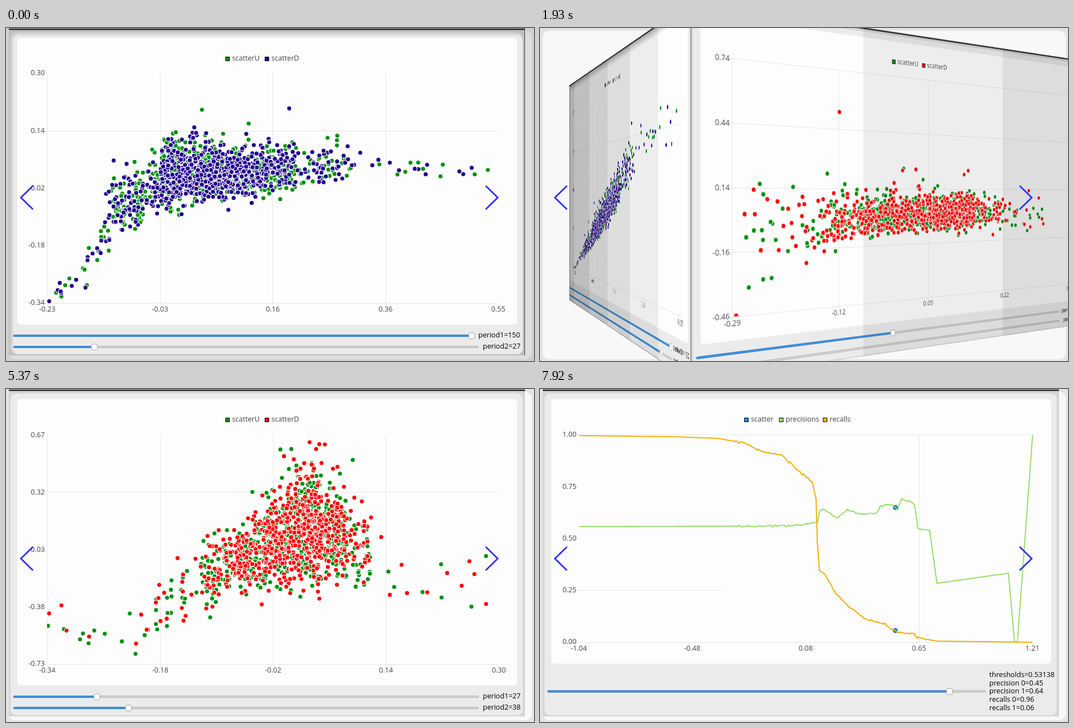
An HTML page with a canvas for the animation above (8 s loop, 939 by 593 pixels).

```html
<!DOCTYPE html>
<html lang="en">
<head>
<meta charset="utf-8">
<title>Rotating charts</title>
<style>
html, body { margin: 0; width: 100%; height: 100%; overflow: hidden; }
#stage { position: relative; width: 939px; height: 593px; overflow: hidden; background: #e4e4e4;
  perspective: 1199px; perspective-origin: 464px 297px; }
#panel { position: absolute; left: 5px; top: 5px; width: 930px; height: 585px; border-radius: 12px; background: #f8f8f8; }
#stage.grey { background: #d0d0d0; }
#stage.grey #panel { background: #dedede; }
.face { position: absolute; left: 5px; top: 0; width: 918px; height: 583px; transform-origin: 459px 297px -459px; }
.face canvas, .face div { position: absolute; left: 0; top: 0; width: 918px; height: 583px; }
svg { position: absolute; left: 0; top: 0; }
</style>
</head>
<body>
<div id="stage">
  <div id="panel"></div>
  <div class="face"><canvas width="918" height="583"></canvas><div></div></div>
  <div class="face"><canvas width="918" height="583"></canvas><div></div></div>
  <svg width="939" height="593" fill="none">
    <path d="M48 281L26.500 302L48 323M853 281L874.500 302L853 323" stroke="#2f2fff" stroke-width="2.800"/>
    <path id="cursor" d="M880 311v18.500l4.300-4l3.200 7.300l3.200-1.400l-3.200-7h5.700z" fill="#fff" stroke="#000" stroke-width="1.300"/>
  </svg>
</div>
<script>
const LOOP = 8000, STEP = 149.6;
const GREEN = '#00900f', BLUE = '#23008c', RED = '#ff0000';
const FONT = '12.6px "Open Sans", "Noto Sans", sans-serif';
const $ = id => document.getElementById(id);
const mix = (a, b, k) => a + (b - a) * k;

// Piecewise linear lookup through [x, y] points.
function at(points, x) {
  if (x <= points[0][0]) return points[0][1];
  for (let i = 1; i < points.length; i++) {
    const [x0, y0] = points[i - 1], [x1, y1] = points[i];
    if (x <= x1) return mix(y0, y1, (x - x0) / (x1 - x0));
  }
  return points[points.length - 1][1];
}

let seed = 77;
function rnd() {
  seed = (seed * 1664525 + 1013904223) % 4294967296;
  return seed / 4294967296;
}
const gauss = () => (rnd() + rnd() + rnd() + rnd() - 2) * 1.73;

// Leans upward on the screen, with a few far strays.
const skew = a => rnd() < 0.025 ? -2.5 * Math.abs(a) : a > 0 ? 0.85 * a : a;

// Each point is [x, keys]; its keys give the height for every period.
function cloud(n, spread, states) {
  return Array.from({ length: n }, () => {
    const x = at(spread, rnd()), common = gauss();
    return [x, states.map(({ period, mean, dev }) =>
      [period, at(mean, x) + at(dev, x) * skew(0.5 * common + 0.87 * gauss())])];
  });
}

const longCloud = () => cloud(780,
  [[0, 73], [0.012, 160], [0.03, 190], [0.1, 235], [0.16, 275], [0.5, 365], [0.75, 430], [0.93, 515], [0.985, 617], [1, 875]],
  [
    { period: 27,
      mean: [[73, 489], [150, 425], [190, 320], [220, 316], [290, 260], [400, 262], [600, 242], [875, 258]],
      dev: [[73, 2], [180, 26], [300, 32], [400, 24], [620, 18], [660, 8]] },
    { period: 124,
      mean: [[73, 489], [180, 422], [265, 385], [310, 338], [400, 310], [480, 278], [600, 235], [875, 245]],
      dev: [[73, 2], [265, 10], [310, 26], [400, 24], [620, 19]] },
    { period: 141,
      mean: [[73, 489], [200, 430], [435, 319], [606, 228], [875, 150]],
      dev: [[73, 2], [265, 11], [435, 18], [730, 24]] }
  ]);

const shortCloud = () => cloud(700,
  [[0, 73], [0.018, 260], [0.045, 350], [0.12, 410], [0.26, 460], [0.53, 520], [0.8, 562], [0.94, 607], [0.985, 650], [1, 875]],
  [
    { period: 3,
      mean: [[73, 360], [300, 325], [500, 314], [875, 312]],
      dev: [[73, 60], [300, 40], [360, 22], [500, 24], [600, 22], [700, 26]] },
    { period: 38,
      mean: [[73, 425], [220, 438], [345, 340], [420, 304], [480, 272], [540, 250], [600, 262], [650, 300], [740, 365], [875, 320]],
      dev: [[73, 25], [345, 32], [420, 30], [480, 44], [540, 56], [600, 42], [650, 45]] }
  ]);

const wideCloud = () => cloud(600,
  [[0, 73], [0.02, 200], [0.05, 260], [0.11, 315], [0.5, 474], [0.88, 590], [0.97, 670], [1, 790]],
  [{ period: 2, mean: [[73, 350], [474, 331], [790, 333]], dev: [[73, 60], [250, 30], [330, 18], [600, 18], [790, 24]] }]);

const longSeries = [[GREEN, longCloud()], [BLUE, longCloud()]];
const shortSeries = [[GREEN, shortCloud()], [RED, shortCloud()]];
const wideSeries = [[GREEN, wideCloud()], [RED, wideCloud()]];

// A curve through key points that gets jagged in the middle of the chart.
function jagged(keys) {
  const points = [];
  let shift = 0;
  for (let x = 70; x <= 876; x++) {
    if (x % 4 === 0) shift = x > 340 && x < 680 ? (rnd() - 0.5) * 3 : 0;
    points.push([x, Math.min(451, at(keys, x) + shift)]);
  }
  return points;
}

const precision = jagged([[70, 245], [440, 244], [494, 238], [497, 219], [505, 214], [528, 230], [547, 215],
  [575, 224], [598, 221], [606, 208], [628, 206], [636, 216], [643, 194], [666, 205], [672, 248], [693, 252],
  [706, 346], [833, 328], [844, 451], [849, 451], [876, 82]]);
const recall = jagged([[70, 83], [238, 85], [318, 88], [369, 98], [398, 113], [430, 118], [460, 146], [484, 165],
  [491, 195], [493, 268], [497, 322], [508, 331], [527, 366], [549, 387], [575, 408], [612, 418], [635, 433],
  [664, 436], [672, 443], [706, 449], [876, 451]]);

const turns = [[1425, 2175], [5750, 6200]];
const longPeriod = [[0, 27], [1320, 124], [1480, 141]];
const shortPeriod = [[3800, 2], [3860, 3], [4170, 7], [5370, 38]];
const markerX = [[6270, 508], [6710, 614], [7010, 640], [7700, 640], [7900, 632]];

let g;

function box(x, y, w, h, r, fill, stroke) {
  g.beginPath();
  g.roundRect(x, y, w, h, r);
  g.fillStyle = fill;
  g.fill();
  if (stroke) { g.strokeStyle = stroke; g.lineWidth = 1; g.stroke(); }
}

function text(s, x, y, align = 'left', color = '#444') {
  g.font = FONT;
  g.textAlign = align;
  g.textBaseline = 'middle';
  g.fillStyle = color;
  g.fillText(s, x, y);
}

function line(points, color, width = 1) {
  g.beginPath();
  points.forEach(([x, y]) => g.lineTo(x, y));
  g.strokeStyle = color;
  g.lineWidth = width;
  g.stroke();
}

const row = (x0, x1, y) => line([[x0, y + 0.5], [x1, y + 0.5]], '#e6e6e6');
const column = (x, y0, y1) => line([[x + 0.5, y0], [x + 0.5, y1]], '#e6e6e6');

function frame(base, rims, bottom) {
  g.fillStyle = base;
  g.fillRect(5, 0, 918, 583);
  for (const [d, color] of rims) box(d, d, 919 - d, 581 - d, 10, color);
  g.fillStyle = '#2c2628';
  g.fillRect(5, 1, 918, 2.5);
  box(20, 18, 889, bottom - 18, 6, '#fdfdfd');
}

function legend(items) {
  for (const [x, color, name] of items) {
    box(x + 0.5, 51.5, 7, 7, 0, color, '#111');
    text(name, x + 12, 55);
  }
}

function slider(x, y, end) {
  box(13.5, y - 1.5, end - 14, 3, 2, '#d4d4d4', '#b4b4b4');
  box(13.5, y - 1.5, x - 14, 3, 2, '#4597e6', '#2d78c0');
  box(x - 5, y - 5, 10.5, 10.5, 2.5, '#fff', '#a9a9a9');
}

function periodRow(name, value, min, y) {
  const size = String(value).length, end = size > 2 ? 834 : 841;
  slider(19 + (end - 25) * (value - min) / (150 - min), y, end);
  text(`${name}=${value}`, [852, 848, 840][size - 1], y, 'left', '#000');
}

function dots(points, color, radius, ring) {
  g.fillStyle = color;
  g.strokeStyle = '#fff';
  g.lineWidth = ring;
  for (const [x, y] of points) {
    g.beginPath();
    g.arc(x, y, radius, 0, 7);
    g.fill();
    if (ring) g.stroke();
  }
}

function scatter(top, width, xRange, yRange, rows, series, periods) {
  for (const y of rows) row(69, 73 + width, y);
  legend([[390, series[0][0], 'scatterU'], [460, series[1][0], 'scatterD']]);
  for (let i = 0; i < 5; i++) {
    const x = 73 + width * i / 4;
    if (i < 4) column(Math.round(x), top, 494);
    text(mix(...yRange, i / 4).toFixed(2), 69, mix(top + 1, 490, i / 4), 'right');
    text(mix(...xRange, i / 4).toFixed(2), x + 0.5, 502, 'center');
  }
  g.save();
  g.beginPath();
  g.rect(73, top, width, 490 - top);
  g.clip();
  for (const [color, points] of series)
    dots(points.map(([x, keys]) => [x, at(keys, periods[1])]), color, 4.2, 1.2);
  g.restore();
  periodRow('period1', periods[0], 1, 548);
  periodRow('period2', periods[1], 2, 568);
}

function longScene(t) {
  const period = Math.round(at(longPeriod, t)), k = (period - 27) / 97;
  frame('#bdbdbd', [[7, '#cdcdcd'], [10, '#dadada'], [13, '#ebebeb']], 528);
  g.fillStyle = '#444';
  g.fillRect(922, 0, 1, 583);
  scatter(80, 802, [-0.2299, 0.5501], [mix(0.3, 0.5, k), mix(-0.34, -0.25, k)], [183, 490], longSeries, [150, period]);
}

function shortScene(t) {
  frame('#d5d5d5', [[8, '#ebebeb']], 528);
  if (t < 2200) {
    scatter(82, 803, [-0.29, 0.39], [0.74, -0.46], [81, 183, 286, 388, 490], wideSeries, [69, 2]);
    return;
  }
  const period = Math.round(at(shortPeriod, t)), k = (period - 3) / 35;
  scatter(82, 803, [-0.34, 0.3], [mix(0.7, 0.67, k), mix(-0.5, -0.73, k)], [183, 490], shortSeries, [27, period]);
}

function curveScene(t) {
  const x = at(markerX, t), k = (x - 508) / 124;
  frame('#d5d5d5', [[8, '#ebebeb']], 489);
  row(66, 876, 81);
  row(66, 324, 358);
  row(66, 876, 451);
  column(674, 82, 451);
  legend([[363, '#1f86dc', 'scatter'], [425, '#8fdc5a', 'precisions'], [503, '#f5ae0a', 'recalls']]);
  for (let i = 0; i < 5; i++) {
    text((1 - i / 4).toFixed(2), 65, 82 + 92.25 * i, 'right');
    text(mix(-1.0401, 1.2101, i / 4).toFixed(2), 69 + 201.7 * i, 463, 'center');
  }
  dots([[x, at(precision, x)], [x, at(recall, x)]], '#1f7fd0', 4.5);
  line(precision, '#8fdc5a', 1.8);
  line(recall, '#f5ae0a', 2);
  slider(484 + 244 * k, 538.5, 793);
  const rate = (name, a, b) => `${name}=${mix(a, b, k).toFixed(2)}`;
  [`thresholds=${mix(0.18543, 0.53138, k).toFixed(5)}`,
    rate('precision 0', 0.48, 0.45), rate('precision 1', 0.63, 0.64),
    rate('recalls 0', 0.77, 0.96), rate('recalls 1', 0.32, 0.06)
  ].forEach((s, i) => text(s, 799, 510 + 14.6 * i, 'left', '#000'));
}

const scenes = [longScene, shortScene, curveScene];
const faces = [...document.querySelectorAll('.face')].map(el => {
  const ctx = el.firstChild.getContext('2d');
  ctx.translate(-5, 0);
  return { el, ctx, veil: el.lastChild };
});

// Banded darkening away from the shared cube edge; bands narrow as the face turns.
function shade(angle) {
  if (!angle) return 'none';
  const size = 10350 / Math.abs(angle);
  const edge = k => k ? (k - 0.07) * size : 0;
  const bands = [0, 1, 2, 3, 4, 5, 6, 7].map(k => `rgba(0,0,0,${k * 0.062}) ${edge(k)}px ${edge(k + 1)}px`);
  return `linear-gradient(to ${angle < 0 ? 'left' : 'right'}, ${bands})`;
}

function show(face, scene, t, angle) {
  g = face.ctx;
  g.clearRect(5, 0, 918, 583);
  scenes[scene](t);
  face.el.style.display = 'block';
  face.el.style.transform = angle ? `rotateY(${angle}deg)` : 'none';
  face.veil.style.background = shade(angle);
}

function draw(step) {
  const t = step * STEP - 20;
  const turn = turns.find(([a, b]) => t >= a && t < b);
  const scene = turns.filter(([a]) => t >= a).length;
  $('stage').className = scene ? '' : 'grey';
  $('cursor').style.display = step === 9 ? 'block' : 'none';
  faces[0].el.style.display = 'none';
  const p = turn ? (t - turn[0]) / (turn[1] - turn[0]) : 1;
  if (turn) show(faces[0], scene - 1, t, -90 * p);
  show(faces[1], scene, t, 90 * (1 - p));
}

// The picture is held for one step at a time.
let last = -1;
function loop() {
  const step = Math.floor((performance.now() % LOOP + 20) / STEP);
  if (step !== last) draw(last = step);
  requestAnimationFrame(loop);
}
loop();
</script>
</body>
</html>
```
